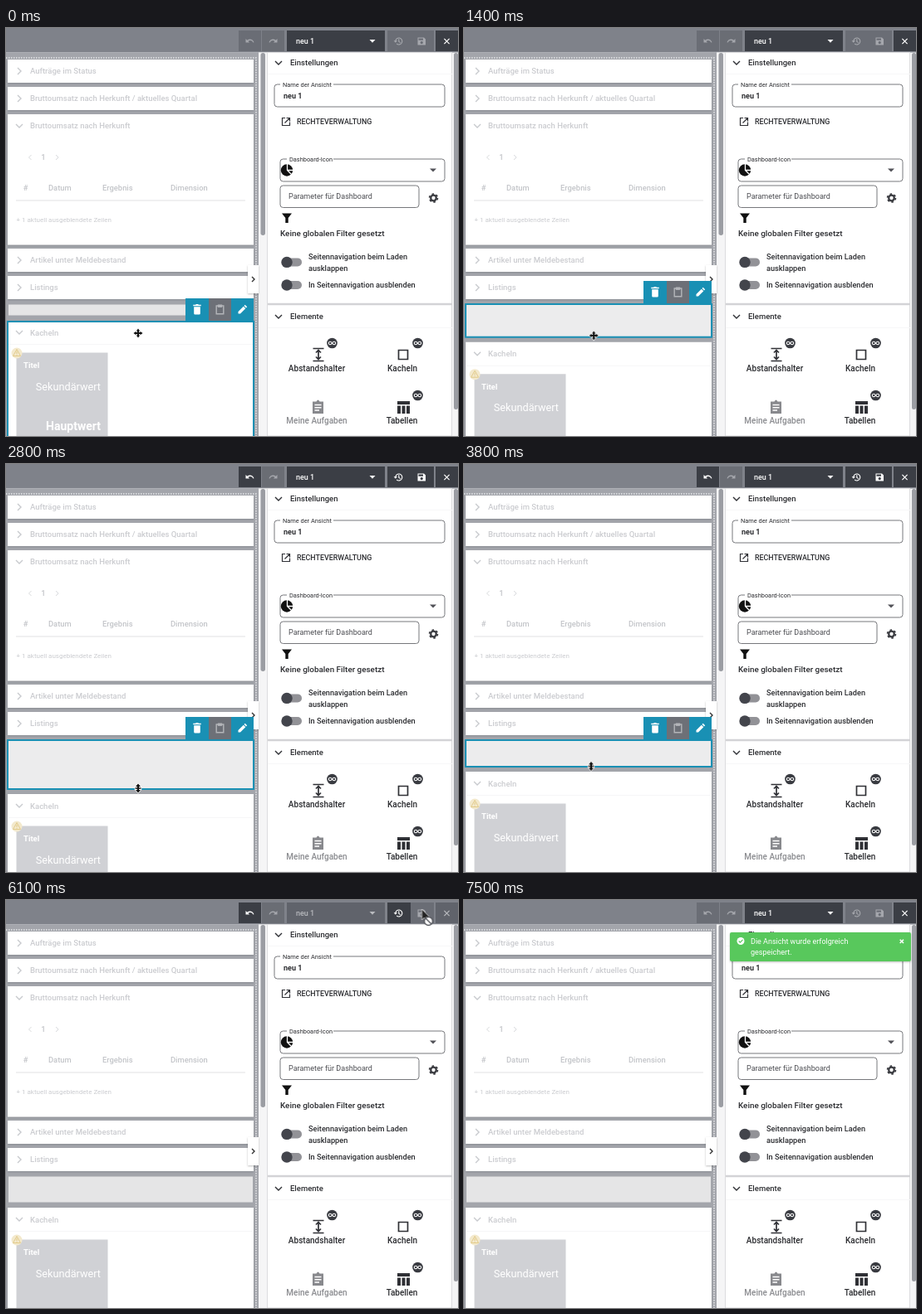
Animation, 544 px wide and 492 px high, one loop 8.2 s. Source, as an HTML page:

```html
<!DOCTYPE html>
<html lang="de">
<head>
<meta charset="utf-8">
<title>Dashboard bearbeiten</title>
<style>
@property --grow { syntax: '<length>'; inherits: true; initial-value: 0px; }

html, body { margin: 0; width: 544px; height: 492px; overflow: hidden; }
svg { display: block; animation: grow 8.2s infinite step-end; }
text { font: 9.5px Roboto, Arial, sans-serif; fill: #2b2c30; }
.m { font-weight: 500; }
.b { font-weight: 700; }
.s10 { font-size: 10px; font-weight: 500; }
.s93 { font-size: 9.2px; font-weight: 500; }
.s9 { font-size: 9px; }
.s8 { font-size: 8px; }
.s7 { font-size: 7.4px; }
.mid { text-anchor: middle; }
.end { text-anchor: end; }
.faded text { fill: #cbccd0; }
.faded .th { fill: #c3c5c9; font-size: 9.4px; font-weight: 500; }
.white text, text.white { fill: #fff; }
.line { fill: none; stroke: currentColor; stroke-width: 1.4; }
.box { fill: #fff; stroke: #77787c; }

.spacer { height: calc(13px + var(--grow)); }
.outline { height: calc(14px + var(--grow)); }
.tiles { transform: translateY(var(--grow)); }

.anim, .cursor, .cursor > g { animation: 8.2s infinite step-end; }
.cursor > g { opacity: 0; }
.tiles-hover { animation-name: tilesHover; }
.spacer-hover { opacity: 0; animation-name: spacerHover; }
.edited { opacity: .3; animation-name: edited; }
.savable { opacity: .3; animation-name: savable; }
.idle { animation-name: idle; }
.toast { opacity: 0; animation-name: toast; }
.cursor { animation-name: travel; }
.cursor > .c-move { animation-name: cMove; }
.cursor > .c-size { animation-name: cSize; }
.cursor > .c-arrow { animation-name: cArrow; }
.cursor > .c-hand { animation-name: cHand; }
.cursor > .c-ban { animation-name: cBan; }

@keyframes grow {
  0% { --grow: 0px; }
  13.41% { --grow: 0px; animation-timing-function: steps(7, start); }
  21.95% { --grow: 45px; }
  39.02% { --grow: 45px; animation-timing-function: steps(3, start); }
  42.68%, 100% { --grow: 18px; }
}
@keyframes travel {
  0% { transform: translate(159px, 368px); }
  1.21% { transform: translate(159px, 368px); animation-timing-function: steps(8, start); }
  10.97% { transform: translate(152.5px, 344px); }
  13.41% { transform: translate(152.5px, 344px); animation-timing-function: steps(7, start); }
  21.95% { transform: translate(159px, 391px); }
  39.02% { transform: translate(159px, 391px); animation-timing-function: steps(3, start); }
  42.68% { transform: translate(153px, 364.5px); }
  51.21% { transform: translate(153px, 364.5px); animation-timing-function: steps(9, start); }
  62.19% { transform: translate(508.5px, 33.5px); animation-timing-function: steps(6, start); }
  69.51% { transform: translate(502.5px, 16px); }
  82.92% { transform: translate(502.5px, 16px); animation-timing-function: steps(4, start); }
  87.8%, 100% { transform: translate(502.5px, -30px); }
}
@keyframes tilesHover { 0% { opacity: 1; } 6.09%, 100% { opacity: 0; } }
@keyframes spacerHover { 0% { opacity: 0; } 6.09% { opacity: 1; } 52.43%, 100% { opacity: 0; } }
@keyframes edited { 0% { opacity: .3; } 26.82% { opacity: 1; } 78.04%, 100% { opacity: .3; } }
@keyframes savable { 0% { opacity: .3; } 26.82% { opacity: 1; } 70.73%, 100% { opacity: .3; } }
@keyframes idle { 0% { opacity: 1; } 70.73% { opacity: .45; } 78.04%, 100% { opacity: 1; } }
@keyframes toast { 0% { opacity: 0; } 78.04% { opacity: .5; } 79.26%, 100% { opacity: 1; } }
@keyframes cMove {
  0% { opacity: 1; } 6.09% { opacity: 0; }
  13.41% { opacity: 1; } 26.82% { opacity: 0; }
  39.02% { opacity: 1; } 46.34% { opacity: 0; }
  51.21% { opacity: 1; } 56.09%, 100% { opacity: 0; }
}
@keyframes cSize {
  0% { opacity: 0; } 6.09% { opacity: 1; } 13.41% { opacity: 0; }
  26.82% { opacity: 1; } 39.02% { opacity: 0; }
  46.34% { opacity: 1; } 51.21%, 100% { opacity: 0; }
}
@keyframes cArrow { 0% { opacity: 0; } 56.09% { opacity: 1; } 60.97%, 100% { opacity: 0; } }
@keyframes cHand { 0% { opacity: 0; } 60.97% { opacity: 1; } 70.73%, 100% { opacity: 0; } }
@keyframes cBan { 0% { opacity: 0; } 70.73%, 100% { opacity: 1; } }
</style>
</head>
<body>
<svg width="544" height="492" viewBox="0 0 544 492">
  <defs>
    <filter id="shade" x="-5%" y="-20%" width="110%" height="150%">
      <feDropShadow dx="0" dy="1" stdDeviation="1.2" flood-color="#60636a" flood-opacity=".4"/>
    </filter>
    <filter id="soft" x="-40%" y="-20%" width="180%" height="140%">
      <feDropShadow dx="0" dy="1" stdDeviation="1.2" flood-opacity=".25"/>
    </filter>
    <path id="right" class="line" d="M-2-4 2 0-2 4"/>
    <path id="down" class="line" d="M-4-2 0 2 4-2"/>
    <path id="undo" d="M-5-3V1.5H-.5L-2.1-.2C.8-2.1 3.2-.5 3.9 1.6L5 1.2C3.8-2.2.1-3.7-3.3-1.3Z" fill="currentColor"/>
    <g id="clip">
      <path class="line" d="M-4.3-4.5H4.3V5.3H-4.3Z"/>
      <path d="M-2.6-6H2.6V-2.6H-2.6Z" fill="currentColor"/>
    </g>
    <g id="bar">
      <path d="M216 0H298V27H216Z" fill="#1990b4"/>
      <path d="M244 0H271V27H244Z" fill="#6d7077"/>
      <path d="M226.2 10.3H233.8V18.2Q233.8 19.5 232.5 19.5H227.5Q226.2 19.5 226.2 18.2ZM225.3 7.8H228L229 7H231L232 7.8H234.7V9.2H225.3Z" fill="#fff"/>
      <use href="#clip" x="257.5" y="13.5" color="#b3b5b9"/>
      <path d="M279.5 16V18.5H282L288.3 12.2 285.8 9.7ZM286.5 9 287.7 7.8 290.2 10.3 289 11.5Z" fill="#fff"/>
    </g>
    <g id="many">
      <circle r="6.3" fill="#393b41"/>
      <path d="M0 0C-1.5-2.6-4.2-2-4.2 0S-1.5 2.6 0 0 4.2-2 4.2 0 1.5 2.6 0 0Z" fill="none" stroke="#fff" stroke-width="1.1"/>
    </g>
    <g id="switch">
      <rect x="-5" y="-5" width="23" height="10" rx="5" fill="#929297"/>
      <circle r="6.7" fill="#43454c"/>
    </g>
    <path id="pointer" d="M-2-5V8L1 5.3 3 10 5.2 9 3.2 4.5H7.2Z" fill="#222" stroke="#ddd" stroke-width=".8"/>
  </defs>

  <path d="M0 0H544V492H0Z" fill="#f4f4f5"/>
  <path d="M0 0H544V29.5H0Z" fill="#7f828a"/>

  <!-- dashboard column -->
  <path d="M0 29.5H304V492H0Z" fill="#a3a5ab"/>
  <path d="M0 36H301V492" fill="none" stroke="#e8e9eb" stroke-width="1.4" stroke-dasharray="1.5 1.5"/>
  <g fill="#fff" filter="url(#shade)">
    <path d="M2 38H298V66H2ZM2 71H298V99H2ZM2 104H298V261.5H2ZM2 266H298V294H2ZM2 299H298V327H2Z"/>
  </g>
  <g class="faded" color="#c8cace">
    <use href="#right" x="16" y="52"/>
    <text class="m" x="29" y="55.3">Aufträge im Status</text>
    <use href="#right" x="16" y="85"/>
    <text class="m" x="29" y="88.3">Bruttoumsatz nach Herkunft / aktuelles Quartal</text>
    <use href="#down" x="16" y="118"/>
    <text class="m" x="29" y="121.3">Bruttoumsatz nach Herkunft</text>
    <path class="line" d="M30.5 153 27.5 156 30.5 159M60 153 63 156 60 159" style="stroke-width:1" opacity=".7"/>
    <text class="th mid" x="45" y="159">1</text>
    <text class="th mid" x="23.5" y="196.4">#</text>
    <text class="th" x="51" y="196.4">Datum</text>
    <text class="th" x="116" y="196.4">Ergebnis</text>
    <text class="th" x="198" y="196.4">Dimension</text>
    <path d="M12 208H288" stroke="#ebebed" stroke-width="1.5"/>
    <text class="s8" x="12.5" y="234.4">+ 1 aktuell ausgeblendete Zeilen</text>
    <use href="#right" x="16" y="280"/>
    <text class="m" x="29" y="283.3">Artikel unter Meldebestand</text>
    <use href="#right" x="16" y="313"/>
    <text class="m" x="29" y="316.3">Listings</text>
  </g>

  <rect class="spacer" x="3" y="333.5" width="294" fill="#e5e5e6"/>
  <g class="tiles">
    <path d="M2 353H298V500H2Z" fill="#fff" filter="url(#shade)"/>
    <g class="faded" color="#c8cace">
      <use href="#down" x="16" y="367"/>
      <text class="m" x="29" y="370.5">Kacheln</text>
    </g>
    <path d="M3 381.5H297" stroke="#f6f6f7"/>
    <path d="M12.5 391.5H122.5V500H12.5Z" fill="#d0d1d5"/>
    <g class="white">
      <text class="b" x="21" y="410">Titel</text>
      <text class="end" x="114" y="436.5" style="font-size:12.7px">Sekundärwert</text>
      <text class="b end" x="114" y="485" style="font-size:14px">Hauptwert</text>
    </g>
    <circle cx="13" cy="392" r="6.5" fill="#f3e9cd"/>
    <path d="M13 387.5 17.5 395.5H8.5ZM13 390V393M13 393.8V394.8" fill="none" stroke="#e2cb8b"/>
  </g>

  <!-- gutter and collapse tab -->
  <path d="M304 29.5H314V492H304Z" fill="#f5f5f6"/>
  <rect x="306.5" y="30" width="5.5" height="220" rx="2.7" fill="#9b9da3"/>
  <g filter="url(#soft)"><path d="M291 286H304V320H291Z" fill="#fff"/></g>
  <path class="line" d="M296 300 299 303 296 306" color="#333"/>

  <!-- hover frames -->
  <g class="anim tiles-hover">
    <path d="M2 500V354H298V500" fill="none" stroke="#1990b4" stroke-width="2"/>
    <use href="#bar" y="326"/>
  </g>
  <g class="anim spacer-hover">
    <rect class="outline" x="2" y="333" width="296" fill="#ececed" stroke="#1990b4" stroke-width="2"/>
    <use href="#bar" y="305"/>
  </g>

  <!-- settings panel -->
  <path d="M314.5 29.5H536.5V492H314.5Z" fill="#fff" stroke="#dcdcde"/>
  <rect x="539" y="30" width="5" height="430" rx="2.5" fill="#9b9da3"/>
  <path d="M315 333H537" stroke="#d3d3d6" stroke-width="2.5"/>
  <path d="M315 361.5H537M315 55.5H537" stroke="#f7f7f8"/>
  <g color="#303136">
    <use href="#down" x="328" y="42"/>
    <text class="m" x="342" y="45.3">Einstellungen</text>
    <rect class="box" x="323" y="68" width="205" height="27" rx="3.5"/>
    <path d="M330 66H394V71H330Z" fill="#fff"/>
    <text class="s7" x="333" y="71.3">Name der Ansicht</text>
    <text class="b s9" x="334" y="84.8">neu 1</text>
    <path class="line" d="M336 108.5H332.5V117.5H341.5V113.5M337.5 108.5H341.5V112.5M341.5 108.5 335.5 114.5" style="stroke-width:1.2"/>
    <text class="m" x="350" y="116" style="font-size:8.9px">RECHTEVERWALTUNG</text>

    <rect class="box" x="330" y="158" width="198" height="27" rx="3.5"/>
    <path d="M338 156H394V161H338Z" fill="#fff"/>
    <text class="s7" x="341" y="161.3">Dashboard-Icon</text>
    <circle cx="338" cy="171.5" r="7.2" fill="#111"/>
    <path d="M338.5 164V171.5L344 177M338.5 171.5H346" fill="none" stroke="#fff" stroke-width="1.3"/>
    <path d="M510 169.5H518L514 173.5Z" fill="#505157"/>
    <rect class="box" x="330" y="190" width="167" height="26.5" rx="3.5"/>
    <text class="s9" x="340" y="206" style="fill:#4a4b50">Parameter für Dashboard</text>
    <g fill="none" stroke="#3c3d42">
      <circle cx="514.5" cy="205" r="3.3" stroke-width="2.3"/>
      <circle cx="514.5" cy="205" r="4.9" stroke-width="1.8" stroke-dasharray="2.5 2.63"/>
    </g>
    <path d="M332 223.5H344L339.7 229V235H336.3V229Z" fill="#111"/>
    <text class="s10" x="330" y="251" style="font-size:9.9px">Keine globalen Filter gesetzt</text>
    <use href="#switch" x="338" y="282.4"/>
    <text class="s93" x="364" y="278.8">Seitennavigation beim Laden</text>
    <text class="s93" x="364" y="292.8">ausklappen</text>
    <use href="#switch" x="338" y="310"/>
    <text class="s93" x="364" y="313.2">In Seitennavigation ausblenden</text>

    <use href="#down" x="328" y="348"/>
    <text class="m" x="342" y="351.3">Elemente</text>
    <path class="line" d="M369.5 386.5H382.5M369.5 401.5H382.5M376 389V399M373 391.5 376 388.5 379 391.5M373 396.5 376 399.5 379 396.5" style="stroke-width:1.7"/>
    <use href="#many" x="392.5" y="380"/>
    <text class="s10 mid" x="374" y="414">Abstandshalter</text>
    <path class="line" d="M472.5 388.5H483.5V399.5H472.5Z" style="stroke-width:1.7"/>
    <use href="#many" x="495.5" y="380"/>
    <text class="s10 mid" x="477" y="414">Kacheln</text>
    <path d="M369 450.500H373.500Q375.500 446.500 377.500 450.500H382V465H369Z" fill="#88898d"/>
    <path d="M371.5 454.5H379.5M371.5 457.800H379.500M371.500 461H377" stroke="#fff" stroke-width="1.5"/>
    <text class="s10 mid" x="374" y="477.200" style="fill:#8b8c90">Meine Aufgaben</text>
    <path d="M471 450H486V454H471ZM471 455.500H475V465H471ZM476.500 455.500H480.500V465H476.500ZM482 455.500H486V465H482Z" fill="#303136"/>
    <use href="#many" x="495.5" y="443"/>
    <text class="s10 mid" x="476.500" y="477.200">Tabellen</text>
  </g>

  <!-- toolbar -->
  <g fill="#3b3e45" color="#fff">
    <g class="anim edited">
      <path d="M280 3H307V28H280Z"/>
      <use href="#undo" x="293.5" y="16"/>
    </g>
    <g opacity=".3">
      <path d="M308 3H335V28H308Z"/>
      <use href="#undo" transform="translate(321.5 16) scale(-1 1)"/>
    </g>
    <g class="anim idle">
      <path d="M338 3H456V28H338Z"/>
      <text class="m s9 white" x="349" y="19.3">neu 1</text>
      <path d="M437.5 14H444.5L441 17.7Z" fill="#fff"/>
    </g>
    <g class="anim edited">
      <path d="M459 3H487V28H459Z"/>
      <path class="line" d="M468.8 16A4 4 0 1 1 470.2 19M472.8 13.3V16.4L474.8 17.6" style="stroke-width:1.1"/>
      <path d="M466.6 15.2H471L468.8 17.8Z" fill="#fff"/>
    </g>
    <g class="anim savable">
      <path d="M487 3H515V28H487Z"/>
      <path d="M495.5 11.5H503L505 13.5V20.5H495.5ZM496.5 12.5V14.7H502V12.5ZM500.2 16A1.6 1.6 0 1 0 500.3 16Z" fill="#fff" fill-rule="evenodd"/>
    </g>
    <g class="anim idle">
      <path d="M517 3H544V28H517Z"/>
      <path class="line" d="M527.4 12.9 533.6 19.1M533.6 12.9 527.4 19.1" style="stroke-width:1.2"/>
    </g>
  </g>

  <g class="anim toast">
    <rect x="320" y="39" width="218" height="35" rx="2" fill="#58c85b" filter="url(#soft)"/>
    <circle cx="333" cy="49.5" r="4.5" fill="#fff"/>
    <path d="M330.7 49.5 332.4 51.2 335.5 47.9" fill="none" stroke="#58c85b" stroke-width="1.1"/>
    <g class="white">
      <text class="s9" x="345" y="52.5">Die Ansicht wurde erfolgreich</text>
      <text class="s9" x="345" y="66.3">gespeichert.</text>
    </g>
    <path d="M524.7 47.7 529 52M529 47.7 524.7 52" stroke="#fff" stroke-width="1.5"/>
  </g>

  <g class="cursor">
    <g class="c-move">
      <path d="M0-5.5 2.2-2.5H1V-1H2.5V-2.2L5.5 0 2.5 2.2V1H1V2.5H2.2L0 5.5-2.2 2.5H-1V1H-2.5V2.2L-5.5 0-2.5-2.2V-1H-1V-2.5H-2.2Z" fill="#111" stroke="#fff" stroke-width="1.4" paint-order="stroke"/>
    </g>
    <g class="c-size">
      <path d="M0-5.5 3-2H1V-.8H3.5V.8H1V2H3L0 5.5-3 2H-1V.8H-3.5V-.8H-1V-2H-3Z" fill="#111" stroke="#fff" stroke-width="1.4" paint-order="stroke"/>
    </g>
    <g class="c-arrow"><use href="#pointer"/></g>
    <g class="c-hand">
      <path d="M-3-5Q-2-6.5-1-5L.3-2 4-1.8Q5.500-.5 5.500 2L4.800 5.500H-.5L-4.500 1.500Q-4.500 0-3 .4L-1.500 1Z" fill="#fff" stroke="#333" stroke-linejoin="round"/>
      <path d="M1 1.500V4M3 1.500V4" stroke="#333" stroke-width=".8"/>
    </g>
    <g class="c-ban">
      <use href="#pointer"/>
      <circle cx="6" cy="9.500" r="5" fill="#fff" stroke="#55575d" stroke-width="1.4"/>
      <path d="M2.500 6 9.500 13" stroke="#55575d" stroke-width="1.4"/>
    </g>
  </g>
</svg>
</body>
</html>
```
